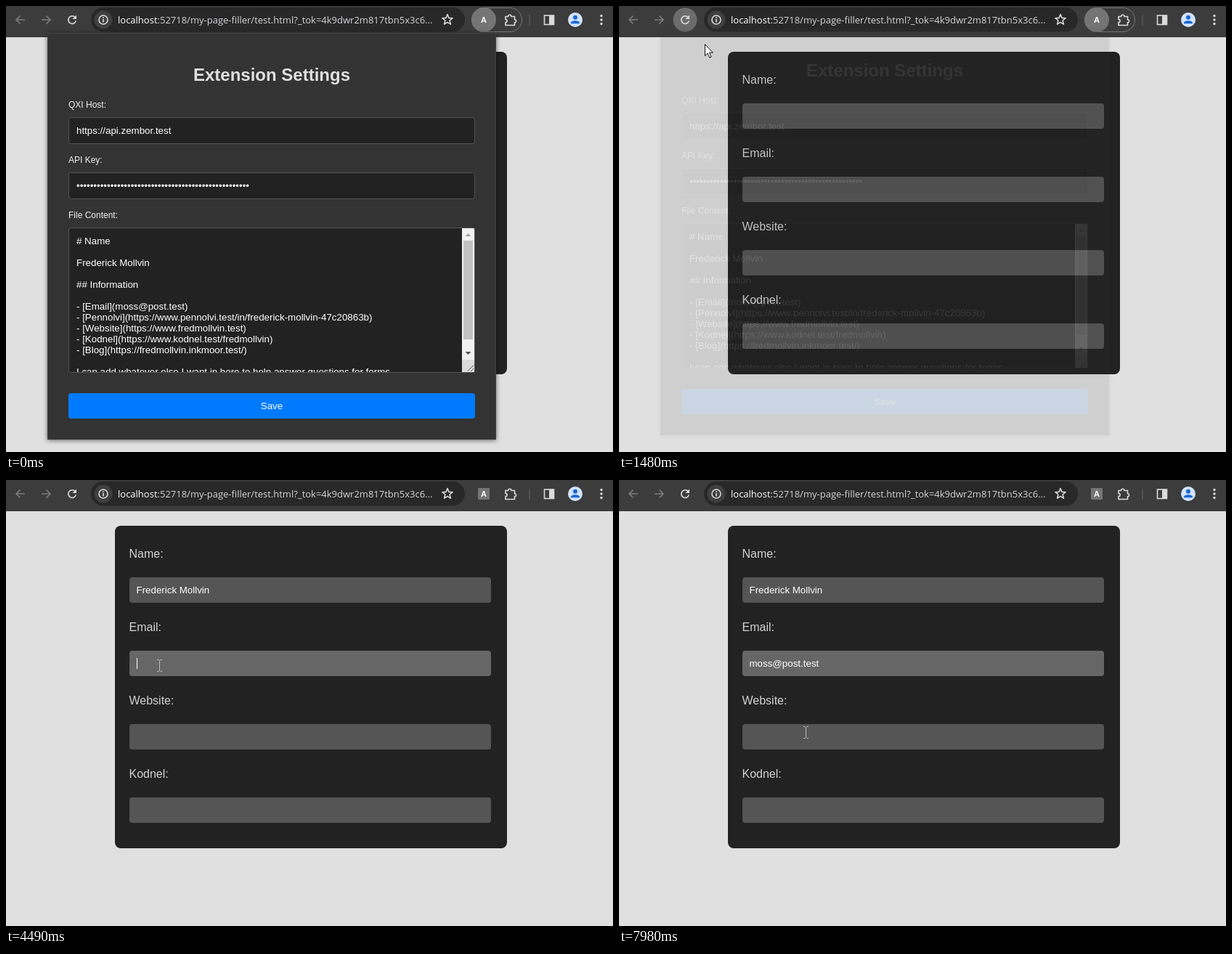
An HTML page for the animation above (8000 ms loop, 836 by 614 pixels).

```html
<!DOCTYPE html>
<html lang="en">
<head>
<meta charset="utf-8">
<title>Form helper demo</title>
<style>
  html, body { margin: 0; width: 100%; height: 100%; overflow: hidden; background: #e0e0e0; }
  svg { display: block; width: 100vw; height: 100vh; }
  text { font: 13.333px "Liberation Sans", Arial, sans-serif; fill: #fff; }
  .url { font: 13px "Open Sans", "Noto Sans", sans-serif; fill: #d4d5d8; }
  .url .host { fill: #fff; }
  .badge { font-size: 11px; font-weight: bold; text-anchor: middle; }
  .label text { font-size: 16px; fill: #d2d2d2; }
  .field { fill: #555; }
  .title { font-size: 24px; font-weight: bold; fill: #e0e0e0; text-anchor: middle; }
  .small { font-size: 12px; fill: #f0f0f0; }
  .box { fill: #222; stroke: #555; }
  .line { fill: none; stroke: #dadada; stroke-width: 1.6; }
  .off { stroke: #7c7c7c; }
  .panel { fill: #333; filter: drop-shadow(0 1px 3px rgba(0, 0, 0, .55)); }

  /* One 8 s timeline shared by every part; 1% = 80 ms */
  .anim { animation: 8s step-end infinite; }
  #popup { animation-name: popup; }
  #pill { animation-name: pill; }
  #hover { animation-name: hover; }
  #name { animation-name: name-focus; }
  #email { animation-name: email-focus; }
  #name-text { animation-name: name-fill; }
  #email-text { animation-name: email-fill; }
  #caret { animation-name: caret; }
  #mouse { animation-name: path; }
  #arrow { animation-name: arrow; }
  #beam { animation-name: beam; }
  #click { animation-name: click; }

  @keyframes popup {
    0% { opacity: 1; transform: none; }
    15.875% { opacity: .95; transform: translateY(-3px); }
    16.75% { opacity: .66; transform: translateY(-4px); }
    17.5% { opacity: .38; transform: translateY(-5px); }
    18.4% { opacity: .1; transform: translateY(-6px); }
    19.25%, 100% { opacity: 0; transform: translateY(-6px); }
  }
  @keyframes pill {
    0% { opacity: 1; }
    20.1% { opacity: .6; }
    21% { opacity: .25; }
    21.8%, 100% { opacity: 0; }
  }
  @keyframes hover {
    0% { opacity: 0; }
    15.875% { opacity: .6; }
    16.75% { opacity: 1; }
    19.25% { opacity: .6; }
    20.1% { opacity: .25; }
    21%, 100% { opacity: 0; }
  }
  @keyframes name-focus {
    0% { fill: #555; }
    28.5% { fill: #666; }
    55.25%, 100% { fill: #555; }
  }
  @keyframes email-focus {
    0% { fill: #555; }
    55.25%, 100% { fill: #666; }
  }
  @keyframes name-fill { 0% { opacity: 0; } 41.125%, 100% { opacity: 1; } }
  @keyframes email-fill { 0% { opacity: 0; } 69.625%, 100% { opacity: 1; } }
  @keyframes caret {
    0% { opacity: 0; transform: none; }
    28.5% { opacity: 1; }
    35.125% { opacity: 0; }
    41.125% { opacity: 1; transform: translate(100px, 0); }
    47.75% { opacity: 0; }
    53.625% { opacity: 1; }
    55.25% { opacity: 0; }
    56.125% { opacity: 1; transform: translate(0, 101px); }
    62.875% { opacity: 0; }
    68.75% { opacity: 1; }
    69.625% { opacity: 1; transform: translate(95px, 101px); }
    75.5% { opacity: 0; }
    81.375% { opacity: 1; }
    87.25% { opacity: 0; }
    93.875% { opacity: 1; }
    99.75%, 100% { opacity: 0; transform: translate(95px, 101px); }
  }
  @keyframes path {
    0% { transform: translate(755px, 640px); }
    1.625% { transform: translate(755px, 598px); animation-timing-function: steps(4); }
    5% { transform: translate(600px, 400px); animation-timing-function: steps(4); }
    8.375% { transform: translate(250px, 125px); animation-timing-function: steps(2); }
    10% { transform: translate(110px, 28px); }
    10.875% { transform: translate(85px, 13px); }
    11.625% { transform: translate(88px, 17px); }
    16.75% { transform: translate(92px, 24px); }
    17.5% { transform: translate(105px, 38px); }
    18.4% { transform: translate(118px, 52px); animation-timing-function: steps(4); }
    21.875% { transform: translate(172px, 112px); animation-timing-function: steps(4); }
    25.375% { transform: translate(203px, 150px); }
    26.875% { transform: translate(205px, 152px); }
    27.625% { transform: translate(204px, 153px); }
    31.875% { transform: translate(203px, 162px); animation-timing-function: steps(3); }
    34.375% { transform: translate(198px, 205px); animation-timing-function: steps(4); }
    37.75% { transform: translate(207px, 250px); }
    40.25% { transform: translate(211px, 255px); }
    68.75% { transform: translate(255px, 256px); }
    69.625% { transform: translate(297px, 258px); }
    84.75% { transform: translate(295px, 262px); animation-timing-function: steps(6); }
    89.75% { transform: translate(270px, 305px); animation-timing-function: steps(6); }
    94.75% { transform: translate(258px, 344px); }
    95.625%, 100% { transform: translate(257px, 347px); }
  }
  @keyframes arrow {
    0% { opacity: 1; }
    5% { opacity: 0; }
    7.5% { opacity: 1; }
    24.5% { opacity: 0; }
    32.6% { opacity: 1; }
    36.85% { opacity: 0; }
    86.4% { opacity: 1; }
    93.9%, 100% { opacity: 0; }
  }
  @keyframes beam {
    0% { opacity: 0; }
    5% { opacity: 1; }
    7.5% { opacity: 0; }
    24.5% { opacity: 1; }
    32.6% { opacity: 0; }
    36.85% { opacity: 1; }
    86.4% { opacity: 0; }
    93.9%, 100% { opacity: 1; }
  }
  @keyframes click {
    0% { opacity: 0; }
    15.875% { opacity: 1; }
    16.75% { opacity: 0; }
    28.5% { opacity: 1; }
    30.125% { opacity: 0; }
    55.25% { opacity: 1; }
    56.125%, 100% { opacity: 0; }
  }
</style>
</head>
<body>
<svg viewBox="0 0 836 614">
  <defs>
    <clipPath id="area"><rect x="87" y="306" width="541" height="198"/></clipPath>
  </defs>

  <!-- Page -->
  <rect width="836" height="614" fill="#e0e0e0"/>
  <rect x="150" y="63" width="540" height="444" rx="8" fill="#222"/>
  <g class="label">
    <text x="169.500" y="107">Name:</text>
    <text x="169.500" y="208">Email:</text>
    <text x="169.500" y="309">Website:</text>
    <text x="169.500" y="410">Kodnel:</text>
  </g>
  <rect id="name" class="field anim" x="170" y="134" width="498" height="35" rx="4"/>
  <rect id="email" class="field anim" x="170" y="235" width="498" height="35" rx="4"/>
  <rect class="field" x="170" y="336" width="498" height="35" rx="4"/>
  <rect class="field" x="170" y="437" width="498" height="35" rx="4"/>
  <text id="name-text" class="anim" x="179.500" y="156">Frederick Mollvin</text>
  <text id="email-text" class="anim" x="179.500" y="257">moss@post.test</text>
  <rect id="caret" class="anim" x="180" y="144" width="1" height="15" fill="#fff"/>

  <!-- Toolbar -->
  <rect width="836" height="43" fill="#3c3c3c"/>
  <path class="line off" d="M26 19H14M19.500 13.500L14 19l5.500 5.500M49 19h12M55.500 13.500L61 19l-5.500 5.500"/>
  <circle id="hover" class="anim" cx="91" cy="19" r="16.500" fill="#6c6c6c"/>
  <path class="line" d="M95.300 15.800A5.300 5.300 0 1 0 96.300 20.400"/>
  <path d="M97 12.500v5.500h-5.500z" fill="#dadada"/>
  <rect x="117" y="2" width="515" height="33.500" rx="16.750" fill="#282828"/>
  <circle cx="134" cy="19" r="12.500" fill="#3f3f3f"/>
  <circle class="line" cx="134" cy="19" r="6"/>
  <path class="line" d="M134 18v4.500M134 15.300v1.600"/>
  <text class="url" x="154" y="24"><tspan class="host">localhost</tspan>:52718/my-page-filler/test.html?_tok=4k9dwr2m817tbn5x3c6...</text>
  <path class="line" stroke-linejoin="round" d="M608 11.500l1.900 4.900 5.200.3-4 3.300 1.300 5.100-4.400-2.800-4.400 2.800 1.300-5.100-4-3.300 5.200-.3z"/>
  <rect x="650" y="11" width="16" height="16" rx="1" fill="#757575"/>
  <g id="pill" class="anim">
    <rect x="641.500" y="2.500" width="69" height="33" rx="16.500" fill="none" stroke="#777"/>
    <circle cx="658" cy="19" r="17" fill="#757575"/>
  </g>
  <text class="badge" x="658" y="23">A</text>
  <path class="line" d="M688 14.500h3.600a2 2 0 0 1 4.400 0h4.500v4.300a2 2 0 0 1 0 4v3.700H688v-3.900a2.100 2.100 0 0 0 0-4.200z"/>
  <path d="M721 12v15" stroke="#666"/>
  <rect class="line" x="741.500" y="13" width="13" height="12.500"/>
  <rect x="748" y="13" width="7" height="12.500" fill="#dadada"/>
  <circle cx="784" cy="19" r="10" fill="#d3e3fd"/>
  <circle cx="784" cy="15.800" r="3" fill="#1967d2"/>
  <path d="M777.800 24.200q0-4 6.200-4t6.200 4z" fill="#1967d2"/>
  <g fill="#dadada">
    <circle cx="820" cy="13.500" r="1.700"/>
    <circle cx="820" cy="19" r="1.700"/>
    <circle cx="820" cy="24.500" r="1.700"/>
  </g>

  <!-- Settings popup -->
  <g id="popup" class="anim">
    <rect class="panel" x="57" y="37" width="618" height="560"/>
    <rect x="57.500" y="37.500" width="617" height="559" fill="none" stroke="#424242"/>
    <text class="title" x="366" y="103">Extension Settings</text>

    <text class="small" x="86" y="140">QXI Host:</text>
    <rect class="box" x="86.500" y="153.500" width="559" height="36" rx="3"/>
    <text x="97" y="176">https://api.zembor.test</text>

    <text class="small" x="86" y="216">API Key:</text>
    <rect class="box" x="86.500" y="229.500" width="559" height="36" rx="3"/>
    <text x="97" y="252">•••••••••••••••••••••••••••••••••••••••••••••••••••</text>

    <text class="small" x="86" y="292">File Content:</text>
    <rect class="box" x="86.500" y="305.500" width="559" height="199" rx="3"/>
    <g clip-path="url(#area)">
      <text y="328">
        <tspan x="97"># Name</tspan>
        <tspan x="97" dy="30">Frederick Mollvin</tspan>
        <tspan x="97" dy="30">## Information</tspan>
        <tspan x="97" dy="30">- [Email](moss@post.test)</tspan>
        <tspan x="97" dy="15">- [Pennolvi](https://www.pennolvi.test/in/frederick-mollvin-47c20863b)</tspan>
        <tspan x="97" dy="15">- [Website](https://www.fredmollvin.test)</tspan>
        <tspan x="97" dy="15">- [Kodnel](https://www.kodnel.test/fredmollvin)</tspan>
        <tspan x="97" dy="15">- [Blog](https://fredmollvin.inkmoor.test/)</tspan>
        <tspan x="97" dy="30">I can add whatever else I want in here to help answer questions for forms</tspan>
      </text>
    </g>
    <rect x="628" y="306" width="17" height="182" fill="#f1f1f1"/>
    <rect x="630" y="323" width="13" height="136" fill="#c1c1c1"/>
    <path d="M632.500 317h8l-4-4z" fill="#a3a3a3"/>
    <path d="M632.500 476h8l-4 4z" fill="#505050"/>
    <rect x="628" y="487" width="17" height="17" fill="#dcdcdc"/>
    <path d="M635.500 503l8.500-8.500M640 503l4-4" stroke="#555" fill="none"/>

    <rect x="86" y="533" width="560" height="35" rx="4" fill="#007bff"/>
    <text x="366" y="555" text-anchor="middle">Save</text>
  </g>

  <!-- Pointer: both shapes share one hotspot -->
  <g id="mouse" class="anim">
    <circle id="click" class="anim" r="12.500" fill="#ffcd00" fill-opacity=".65"/>
    <path id="arrow" class="anim" d="M.5.8v15.700l3.600-3.400 2.700 6 2.300-1-2.700-5.900h4.900z" fill="#fff" stroke="#111"/>
    <path id="beam" class="anim" d="M-3 -7.500h2.500M1.500 -7.500h2.500M.5 -7v15M-3 8.500h2.500M1.500 8.500h2.500" fill="none" stroke="#bcbcbc"/>
  </g>
</svg>
</body>
</html>
```
